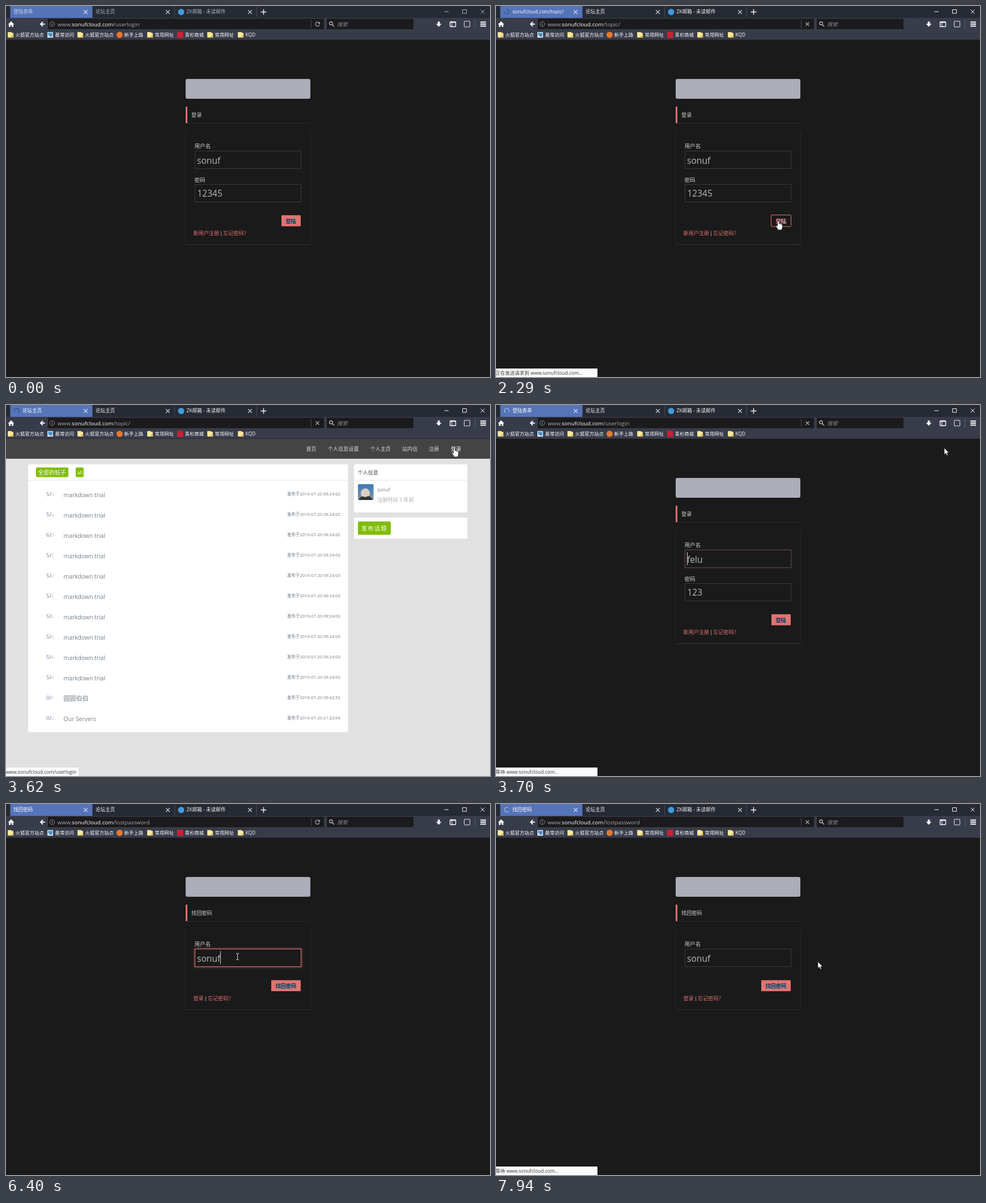
An HTML page that plays this animation: 854x656 px, repeating every 7990 ms.

```html
<!DOCTYPE html>
<html lang="zh-CN">
<head>
<meta charset="utf-8">
<title>登陆表单</title>
<style>
html, body { margin: 0; width: 100%; height: 100%; overflow: hidden; background: #1a1a1a; }
svg { display: block; width: 854px; height: 656px; }
text { font-family: "Open Sans", "Noto Sans CJK SC", "Noto Sans CJK", "Noto Sans", sans-serif; white-space: pre; }
</style>
</head>
<body>
<svg id="stage" viewBox="0 0 854 656" xmlns="http://www.w3.org/2000/svg"></svg>
<script>
const LOOP = 7990;
const USER = 'sonuf', HOST = USER + 'cloud.com';
const RED = '#e27370', GREEN = '#80bd01', DARK = '#1a1a1a';

// Markup helpers
const text = (x, y, s, size, fill, extra = '') =>
  `<text x="${x}" y="${y}" font-size="${size}" fill="${fill}" ${extra}>${s}</text>`;
const rect = (x, y, w, h, fill, extra = '') =>
  `<rect x="${x}" y="${y}" width="${w}" height="${h}" fill="${fill}" ${extra}/>`;
const line = (d, stroke, width = 1, extra = '') =>
  `<path d="${d}" fill="none" stroke="${stroke}" stroke-width="${width}" ${extra}/>`;
const circle = (x, y, r, fill, extra = '') =>
  `<circle cx="${x}" cy="${y}" r="${r}" fill="${fill}" ${extra}/>`;
const group = (id, body, extra = '') => `<g id="${id}" ${extra}>${body}</g>`;
const cross = (x, y, r) => `M${x - r} ${y - r}l${2 * r} ${2 * r}m0 ${-2 * r}l${-2 * r} ${2 * r}`;

function folder(x) {
  return rect(x, 46, 7, 9.5, '#f3d778', 'rx=".8"') +
    rect(x + 1, 47.5, 9, 8, '#ffe9a0', 'rx=".8"') +
    rect(x + 6.5, 52, 4, 3.8, '#e2b94a', 'rx=".5"');
}

function bookmarks() {
  const items = [
    [3, '火狐官方站点', 'folder'], [73, '最常访问', 'recent'], [126, '火狐官方站点', 'folder'],
    [195, '新手上路', 'dot'], [249, '常用网址', 'folder'], [302, '青杉商城', 'square'],
    [355, '常用网址', 'folder'], [409, 'KQD', 'folder']
  ];
  const icons = {
    folder,
    recent: x => rect(x, 46, 10, 10, '#d9e9f7', 'rx="1"') + rect(x + 1, 47, 8, 5, '#5f9fd6') +
      circle(x + 6, 52, 2.4, '#3f7fc0'),
    dot: x => circle(x + 5.5, 51, 5.5, '#e8772a'),
    square: x => rect(x, 45.5, 10.5, 11, '#cb2032')
  };
  return items.map(([x, s, kind]) =>
    icons[kind](x) + text(x + 13.6, 54.2, s, 8.4, '#fff')).join('');
}

function browser() {
  const white = '#f4f5f7';
  return rect(0, 0, 854, 21, '#262a33') + rect(0, 21, 854, 38.5, '#383c4a') +
    rect(0, 59, 854, 1, '#2b2e38') + rect(7.5, 0, 145, 21, '#5574b9') +
    line('M297.5 1V20M442 1V20', '#474c5a') +
    circle(309, 10.5, 5.5, '#3f9be0') +
    text(13, 13.4, '', 8.6, white, 'id="title"') +
    group('tabs', text(158, 13.4, '论坛主页', 8.6, 'currentColor') +
      text(318.5, 13.4, 'ZK邮箱 - 未读邮件', 8.6, 'currentColor') +
      line('M773.5 10H781M805.5 6.5h7v6.5h-7z' + cross(841, 10, 3.4), 'currentColor')) +
    line([140.5, 285.5, 430.5].map(x => cross(x, 10.5, 3.4)).join(''), '#dfe3ee', 1.1) +
    line('M449.5 10.5h10m-5 -5v10', white, 1.4) +
    group('spinner', line('M3.9 1A4 4 0 1 1 1 -3.9', 'currentColor', 1.5)) +
    // navigation row
    '<path d="M3.5 32.5L9 27l5.5 5.5h-1.6v4.5h-2.8v-3.2H8V37H5.1v-4.5z" fill="#fff"/>' +
    rect(74, 22.5, 487, 18.5, '#1b1b1d') + rect(566, 22.5, 153, 18.5, '#1b1b1d') +
    line('M68.5 32h-7m3.4 -3.8l-3.8 3.8l3.8 3.8', '#fff', 1.9) +
    circle(81.5, 32, 4.2, 'none', 'stroke="#9a9a9a" stroke-width=".9"') +
    line('M81.5 31.2v3M81.5 29.4v.9', '#9a9a9a') +
    `<text y="36" font-size="9.8" fill="#a6a6a8" x="91">www.<tspan fill="#fff">${HOST}</tspan><tspan id="path"></tspan></text>` +
    line('M538.5 25V39', '#4a4a4e') +
    group('reload', line('M552.6 30.2A3.6 3.6 0 1 0 553 33M553.4 28v2.8h-2.8', '#a9a9ab', 1.2)) +
    group('stop', line(cross(549.5, 32, 3), '#a9a9ab', 1.3)) +
    circle(573.5, 30.7, 2.7, 'none', 'stroke="#b5b5b8" stroke-width="1.3"') +
    line('M575.5 32.8l3.6 3.4', '#b5b5b8', 1.5) +
    text(584, 35.8, '搜索', 9.4, '#85858a', 'font-style="italic"') +
    '<path d="M761.8 27.5h3.6v4h3l-4.8 5.3l-4.8 -5.3h3z" fill="#fff"/>' +
    rect(783.5, 28, 10, 8.5, 'none', 'stroke="#fff" stroke-width="1.3" rx="1"') +
    line('M786.8 28v8M784 29.2h9', '#fff') +
    rect(808.5, 27, 10, 10, 'none', 'stroke="#e9eaec" rx="1"') +
    line('M827.5 24V40', '#555a69') +
    line('M837 28.5h10M837 32h10M837 35.5h10', '#fff', 1.9) + bookmarks();
}

// Button whose fill fades away on hover, leaving an outline
function button(id, x, y, w, label) {
  const tx = x + 7.4, ty = y + 13.7;
  const caption = (dx, fill) => text(tx + dx, ty + dx, label, 9.2, fill, 'font-weight="bold"');
  return rect(x, y, w, 19.5, RED, `id="${id}Fill" rx="1"`) +
    group(id + 'Dark', caption(.6, '#6c8fa8') + caption(0, '#163a55')) +
    group(id + 'Lit', rect(x - .5, y - .5, w + 1, 20.5, 'none', `stroke="${RED}" rx="1.5"`) +
      caption(.6, '#4d8fc0') + caption(0, RED));
}

const field = y => rect(333.5, y, 187, 31, DARK, 'stroke="#393939"');

function frame(heading, bottom) {
  return rect(0, 60, 854, 596, DARK) + rect(317, 129, 220, 35, '#abaeb9', 'rx="3"') +
    rect(317, 178, 3, 30, RED) + text(327, 196, heading, 9.2, '#d2d2d2') +
    line('M317 207.5H537', '#2b2b2b') +
    line(`M316.5 222V${bottom - 2}q0 2 2 2H535.5q2 0 2 -2V222`, '#262626') +
    line(`M318 ${bottom}H536`, '#2f2f2f') +
    text(332.5, 251, '用户名', 9.6, '#d2d2d2') + field(256.5);
}

function links(y, first, middle) {
  return text(330.5, y, first, 9.1, RED) + text(middle - 2.5, y, '|', 9.1, '#ddd') +
    text(middle + 3.3, y, '忘记密码？', 9.1, RED);
}

const loginPage = () => frame('登录', 422) + text(332.5, 310.8, '密码', 9.6, '#d2d2d2') +
  field(315.5) + text(337.5, 337, '', 15.5, '#b9b9b9', 'id="pass"') +
  button('login', 486, 370, 34, '登陆') + links(405.3, '新用户注册', 379.8);

const lostPage = () => frame('找回密码', 363.5) +
  button('lost', 468, 311.5, 52, '找回密码') + links(346.7, '登录', 352.8);

function topicRow(i) {
  const y = 36 * i;
  const score = [5, 5, 6, 5, 5, 5, 5, 5, 5, 5, 0, 0][i];
  const replies = [3, 4, 3, 2, 2, 2, 0, 0, 0, 0, 1, 2][i];
  const title = i < 10 ? 'markdown trial' : i === 10 ? '圆圆伯伯' : 'Our Servers';
  const clock = i < 3 ? '09:24:02' : i < 10 ? '09:24:03' : i === 10 ? '09:42:52' : '21:22:04';
  return text(71, 161 + y, score, 9.8, '#8d72c0') + text(77, 161 + y, '/', 8.5, '#555') +
    text(80.5, 161 + y, replies, 6.4, '#b4b4b4') +
    text(101.5, 163 + y, title, i === 10 ? 11 : 10.4, '#74808a') +
    text(496, 160.3 + y, '发布于2019-07-20 ' + clock, 7.55, '#6f7880');
}

function forumPage() {
  const nav = [[529.5, '首页'], [568, '个人信息设置'], [642.5, '个人主页'], [699, '站内信'], [746, '注册']];
  return rect(0, 60, 854, 596, '#e1e1e1') + rect(0, 60, 854, 35, '#444') +
    nav.map(([x, s]) => text(x, 81.3, s, 9.1, '#d6d6d6')).join('') +
    text(785, 81.3, '登录', 9.1, '#d6d6d6', 'id="navLogin"') +
    rect(39, 105, 564.5, 473.5, '#fff', 'rx="2"') + line('M39 133H603.5', '#e3e3e3') +
    rect(53, 110.5, 57, 17, GREEN, 'rx="2"') + text(56.5, 122.7, '全部的帖子', 9.8, '#fff') +
    rect(123, 110.5, 14, 17, GREEN, 'rx="2"') + text(125.6, 122.5, 'all', 9, '#fff') +
    Array.from({ length: 12 }, (_, i) => topicRow(i)).join('') +
    rect(614, 105, 200, 85, '#fff', 'rx="2"') + line('M614 133H814', '#e3e3e3') +
    text(620.5, 122.7, '个人信息', 9.1, '#444') +
    rect(621, 140, 27.5, 28, 'url(#photo)', 'rx="2"') +
    '<ellipse cx="634" cy="156" rx="8" ry="8.5" fill="#d9d2c0"/><path d="M622 168q4 -9 12 -5q9 -5 13 5z" fill="#38342f"/>' +
    text(655, 153.3, USER, 8.6, '#778087') + text(655, 171, '注册时间 3 年前', 9.1, '#a9a9a9') +
    rect(614, 199, 200, 37.5, '#fff', 'rx="2"') + rect(621, 206, 58, 23.5, GREEN, 'rx="2.5"') +
    text(627, 221.6, '发布话题', 10, '#fff', 'letter-spacing="1.5"');
}

const cursors = () =>
  group('arrow', '<path d="M0 0V11.6L2.7 9.1L4.5 13.2L6.4 12.4L4.6 8.4H8.2z" fill="#fff" stroke="#111" stroke-width=".6"/>') +
  group('hand', '<path d="M-1.4 1Q0 -1 1.4 1V5Q3 4 3.8 5.5Q5.2 4.8 5.8 6.1Q7.4 5.8 7.5 7.6V11Q7 13 6 16H-.4Q-1 13.5 -3.6 10.6Q-5 8.4 -3.2 8Q-2.2 8 -1.4 9.6z" fill="#fff" stroke="#111" stroke-width=".7"/>') +
  group('beam', line('M-2.5 -5.5H-.6L0 -5L.6 -5.5H2.5M0 -5V5M-2.5 5.5H-.6L0 5L.6 5.5H2.5', '#ddd'));

document.getElementById('stage').innerHTML =
  `<defs><linearGradient id="photo" x2="0" y2="1"><stop stop-color="#3f78b8"/><stop offset="1" stop-color="#7f97a8"/></linearGradient>
  <filter id="blur" x="-10%" y="-40%" width="120%" height="180%"><feGaussianBlur stdDeviation="1.6"/></filter></defs>` +
  group('loginPage', loginPage()) + group('forumPage', forumPage()) + group('lostPage', lostPage()) +
  group('userField',
    group('glow', rect(333, 256, 188, 32, 'none', `stroke="${RED}" stroke-width="2" stroke-opacity=".6" filter="url(#blur)"`) +
      rect(333.5, 256.5, 187, 31, DARK, 'stroke="#d56c69"')) +
    text(337, 278.5, '', 15.6, '#b9b9b9', 'id="user"') +
    rect(337, 260, 1, 23, '#ccc', 'id="caret"')) +
  group('popup', rect(333, 288, 187, 14, '#fff', 'id="row"') +
    text(336, 298.2, USER, 8.6, '#111', 'id="rowText"')) +
  group('status', rect(0, 641, 179, 15, '#fbfbfb', 'id="statusBox"') +
    text(-1, 652, '', 8.5, '#3a3a3a', 'id="statusText"')) +
  browser() + group('pointer', cursors());

const $ = id => document.getElementById(id);
const show = (id, on) => { $(id).style.display = on ? '' : 'none'; };
const alpha = (id, a) => { $(id).style.opacity = a; };
const write = (id, s) => { if ($(id).textContent !== s) $(id).textContent = s; };
const clamp = v => Math.max(0, Math.min(1, v));
const ease = v => v * v * (3 - 2 * v);

// Last value whose start time has passed
const at = (table, t) => table.reduce((v, [start, next]) => t >= start ? next : v, table[0][1]);
const fade = (t, on, off, dur) => clamp((t - on) / dur) * (1 - clamp((t - off) / dur));

const WAIT = `等待 www.${HOST}...`;
const SEND = `正在发送请求到 www.${HOST}...`;
const LINK = `www.${HOST}/`;

const page = [[0, 'loginPage'], [2320, 'forumPage'], [3700, 'loginPage'], [4580, 'lostPage']];
const title = [[0, '登陆表单'], [2200, HOST + '/topic/'], [2320, '论坛主页'], [3700, '登陆表单'], [4580, '找回密码']];
const path = [[0, '/userlogin'], [2200, '/topic/'], [3700, '/userlogin'], [4580, '/lostpassword']];
const loading = [[0, 0], [2100, 1], [2320, 0], [3620, 1], [3780, 0], [4460, 1], [4620, 0], [7660, 1]];
const status = [[0, ''], [2100, WAIT], [2200, SEND], [2320, WAIT], [2460, ''], [3380, LINK + 'userlogin'],
  [3700, WAIT], [3780, ''], [4330, LINK + 'lostpassword'], [4500, WAIT], [4620, ''], [7660, WAIT]];
const user = [[0, USER], [3700, 'felu'], [4580, ''], [5550, 's'], [5680, 'so'], [6400, USER]];
const caret = [[0, 0], [3700, 1], [4230, 0], [4580, 1], [5090, 0], [5550, 1], [6160, 0], [6400, 1], [6630, 0], [7160, 1], [7640, 0]];
const shape = [[0, 'arrow'], [890, 'hand'], [2320, 'arrow'], [3380, 'hand'], [3700, 'arrow'], [4330, 'hand'],
  [4580, 'arrow'], [4840, 'beam'], [7000, 'arrow'], [7440, 'hand'], [7760, 'arrow']];
const moves = [[130, 711, 583], [920, 498, 380], [2440, 498, 380], [2580, 728, 211], [2800, 728, 211],
  [3080, 743, 118], [3480, 791, 75.5], [3740, 791, 76], [4410, 408, 400.5], [4690, 408, 400.5],
  [4910, 408.5, 269.8], [6890, 408.5, 269.8], [7600, 496, 317], [7700, 496, 317], [7920, 568, 279]];

function place(t) {
  const i = moves.findIndex(m => m[0] > t);
  if (i <= 0) return (i ? moves[moves.length - 1] : moves[0]).slice(1);
  const a = moves[i - 1], b = moves[i], k = ease((t - a[0]) / (b[0] - a[0]));
  return [a[1] + (b[1] - a[1]) * k, a[2] + (b[2] - a[2]) * k];
}

function hover(id, h) {
  alpha(id + 'Fill', 1 - h);
  alpha(id + 'Dark', 1 - h);
  alpha(id + 'Lit', h);
}

function draw(t) {
  const current = at(page, t), busy = at(loading, t), note = at(status, t);
  ['loginPage', 'forumPage', 'lostPage'].forEach(id => show(id, id === current));
  show('userField', current !== 'forumPage');

  // browser frame; the window gains focus with the first click
  $('tabs').style.color = t < 2100 ? '#adb1bc' : '#f4f5f7';
  $('title').setAttribute('fill', t < 2100 ? '#c6d0e6' : '#fff');
  $('title').setAttribute('x', busy ? 29 : 13);
  write('title', at(title, t));
  write('path', at(path, t));
  show('reload', !busy);
  show('stop', busy);
  show('spinner', busy);
  $('spinner').setAttribute('transform', `translate(19 10) rotate(${-(t % 1000) * .36})`);
  $('spinner').style.color = t < 3700 ? '#34518f' : '#a3b1cf';
  show('status', note);
  write('statusText', note);
  $('statusBox').setAttribute('width', note.startsWith('www') ? (note.endsWith('login') ? 128 : 143) : 179);

  // form
  hover('login', fade(t, 880, 2400, 120));
  hover('lost', fade(t, 7440, 7740, 110));
  write('pass', t < 3000 ? '12345' : '123');
  write('user', at(user, t));
  alpha('glow', t < 4580 ? fade(t, 3650, 9000, 220) : fade(t, 4540, 7640, 110));
  show('caret', at(caret, t));
  const typed = t >= 4580 && $('user').textContent ? $('user').getComputedTextLength() : 0;
  $('caret').setAttribute('x', Math.round(337 + typed));
  show('popup', t >= 5600 && t < 6400);
  $('row').setAttribute('fill', t < 6140 ? '#fff' : '#3399ff');
  $('rowText').setAttribute('fill', t < 6140 ? '#111' : '#fff');
  $('navLogin').setAttribute('fill', t >= 3380 ? '#fff' : '#d6d6d6');

  // pointer
  const kind = at(shape, t);
  ['arrow', 'hand', 'beam'].forEach(id => show(id, id === kind));
  show('pointer', t >= 130);
  $('pointer').setAttribute('transform', `translate(${place(t).map(v => v.toFixed(1))})`);
}

const start = performance.now();
function tick() {
  draw((performance.now() - start) % LOOP);
  requestAnimationFrame(tick);
}
tick();
</script>
</body>
</html>
```
